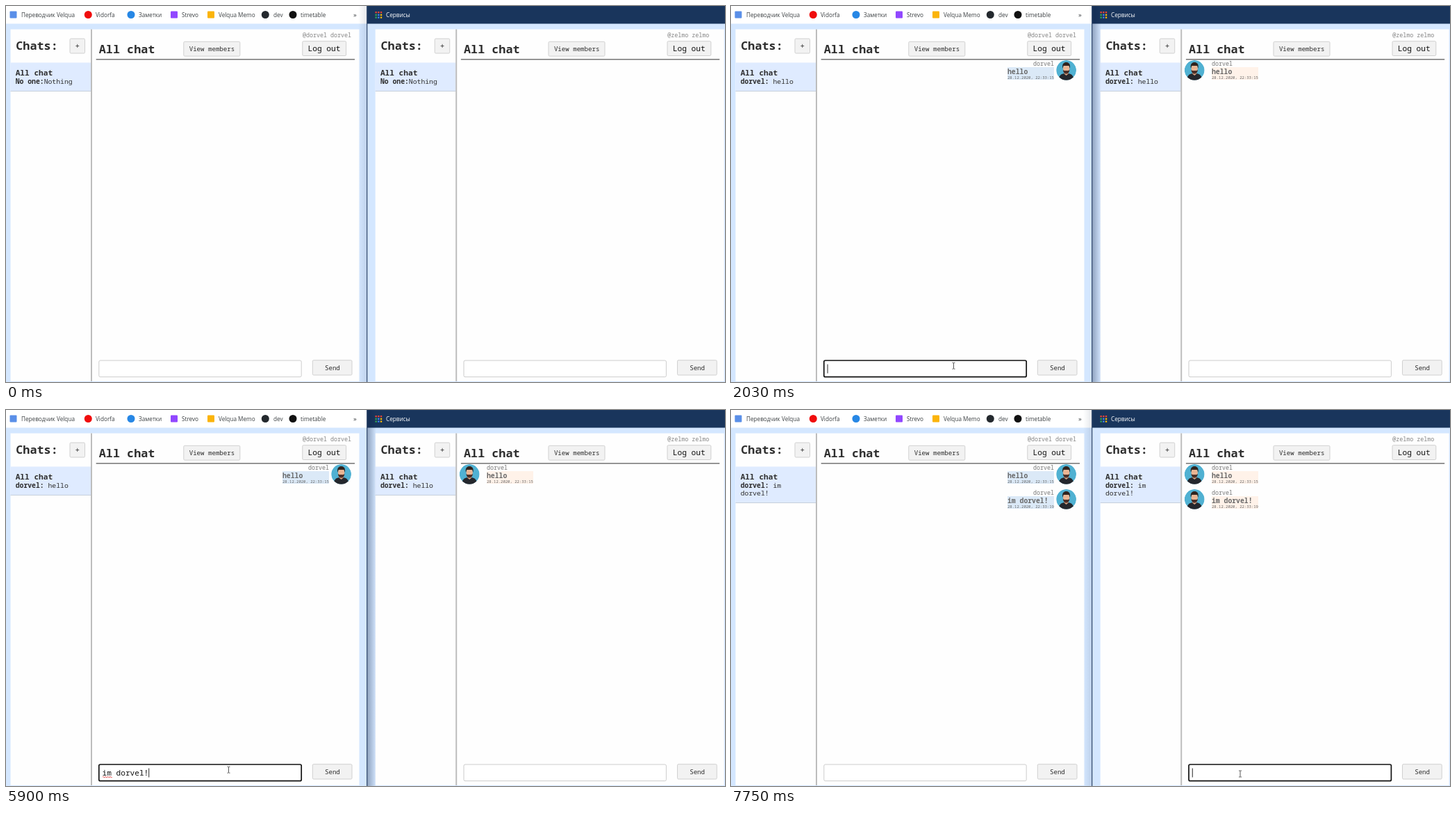
Write an HTML page that moves like this. It is 1035 by 541 pixels and loops after 8000 ms.

```html
<!DOCTYPE html>
<html lang="en">
<head>
<meta charset="utf-8">
<title>Two chat windows</title>
<style>
  html, body { margin: 0; width: 100%; height: 100%; overflow: hidden; background: #d4e7ff; }
  svg { display: block; }
  text { font-family: "Noto Sans Mono", "DejaVu Sans Mono", monospace; white-space: pre; fill: #2d2d2d; }
  .ui { font-family: "Open Sans", "Noto Sans", sans-serif; font-size: 8.2px; fill: #3c4043; }
  .b { font-weight: 700; }
  .m { font-weight: 500; }
</style>
</head>
<body>
<svg id="stage" width="1035" height="541" viewBox="0 0 1035 541"></svg>
<script>
const LOOP = 8000;
const SHIFT = 525.2;
const CHAR = 6.67;
const INPUT_X = 138.6;
const ME = 'dorvel', OTHER = 'zelmo';

const rect = (x, y, w, h, fill, extra = '') =>
  `<rect x="${x}" y="${y}" width="${w}" height="${h}" fill="${fill}" ${extra}/>`;
const text = (x, y, size, str, cls = '', extra = '') =>
  `<text x="${x}" y="${y}" font-size="${size}" class="${cls}" ${extra}>${str}</text>`;
const button = (x, y, w, h, id = '') =>
  rect(x, y, w, h, '#f2f2f2', `rx="1.5" stroke="#d0d0d0" id="${id}"`);

const avatar = (x, y) => `<g transform="translate(${x} ${y})" clip-path="url(#round)">
  <circle r="14.4" fill="#50b1d2"/>
  <path d="M-11 15C-11 8-8 5.5-3 4.5L0 7 3 4.5C8 5.5 11 8 11 15Z" fill="#24272d"/>
  <path d="M-3 1H3V5L0 7.500-3 5Z" fill="#dba07e"/>
  <ellipse cy="-2.500" rx="4.700" ry="6" fill="#eab593"/>
  <path d="M-4.700-1C-4 1-2 .6 0 .6S4 1 4.700-1C4.600 3 2.500 5 0 5S-4.600 3-4.700-1Z" fill="#4b3029"/>
  <path d="M-5.200-2.500C-6.500-9-3.500-11.500 0-11.500S6.500-9 5.200-2.500L4-6.500H-4Z" fill="#30241f"/>
</g>`;

function message(own, y, body, time) {
  const x = own ? 398 : 692 - SHIFT;
  const name = own ? text(465, y + 8, 8.35, ME, 'm', 'text-anchor="end" style="fill:#777"')
                   : text(x, y + 8, 8.35, ME, 'm', 'style="fill:#777"');
  return name
    + rect(x, y + 10, 67, 18, own ? '#dbe9f7' : '#fff2e9')
    + text(x, y + 19.5, 9.75, body, 'b', 'style="fill:#6a6a6a"')
    + text(x, y + 26.5, 5.58, `28.12.2020, ${time}`, '', 'style="fill:#666"')
    + avatar(own ? 482.6 : 142, y + 14.4);
}

function panel(id, dx, user, own) {
  return `<g transform="translate(${dx} 0)">
    ${rect(6.5, 33.5, 502, 506.5, '#fefefe')}
    <g id="${id}-item"></g>
    ${rect(122, 33.5, 2, 506.500, '#bdbdbd')}
    ${text(14.3, 63, 16.8, 'Chats:', 'b')}
    ${button(92, 47, 21.5, 21, id + '-add')}
    ${text(102.8, 61, 11, '+', 'm', 'text-anchor="middle"')}
    ${text(133.800, 68, 16.8, 'All chat', 'b')}
    ${button(255.8, 51.3, 81, 20.8)}
    ${text(263.7, 64.8, 9.1, 'View members', 'm')}
    ${text(427, 45, 8.35, `@${user} ${user}`, 'm', 'style="fill:#858585"')}
    ${button(426.800, 50.7, 62.8, 20.800)}
    ${text(434.5, 65, 11.2, 'Log out', 'm', 'style="fill:#111"')}
    ${rect(129.7, 76, 372.3, 1.6, '#7c7c7c')}
    <g id="${id}-m1">${message(own, 78, 'hello', '22:33:15')}</g>
    <g id="${id}-m2">${message(own, 114, `im ${ME}!`, '22:33:19')}</g>
    ${rect(133.8, 510, 291.4, 23.700, '#fff', `rx="2" id="${id}-box"`)}
    <text id="${id}-val" x="${INPUT_X}" y="526" font-size="11.12" style="fill:#111"></text>
    <path id="${id}-wave" d="M139 528.200q.85-1.700 1.700 0t1.700 0 1.700 0 1.700 0 1.700 0 1.700 0 1.700 0 1.700 0" fill="none" stroke="#e02020" stroke-width=".9"/>
    ${rect(0, 515.5, 0.9, 13, '#111', `id="${id}-caret"`)}
    ${button(441.3, 509.700, 56.700, 21.300)}
    ${text(459, 524, 9.1, 'Send', 'm')}
  </g>`;
}

// [icon shape, icon centre, colour, label x, label]
const bookmarks = [
  ['s', 10.5, '#5a8fe8', 22, 'Переводчик Velqua'],
  ['c', 118.3, '#f00d0d', 129, 'Vidorfa'],
  ['c', 180, '#2787e5', 191, 'Заметки'],
  ['s', 242, '#9147ff', 253, 'Strevo'],
  ['s', 295, '#fbb40a', 306, 'Velqua Memo'],
  ['c', 373.3, '#24292e', 385, 'dev'],
  ['c', 413, '#111', 424, 'timetable']
];
const marks = bookmarks.map(([shape, x, color, tx, label]) =>
  (shape === 's' ? rect(x - 5, 7.5, 10, 10, color, 'rx="1"')
                 : `<circle cx="${x}" cy="12.5" r="5.500" fill="${color}"/>`)
  + `<text class="ui" x="${tx}" y="15.7">${label}</text>`).join('');

const dotColors = ['#ea4335', '#ea4335', '#ea4335', '#34a853', '#4285f4', '#fbbc05', '#34a853', '#4285f4', '#fbbc05'];
const dots = dotColors.map((c, i) => rect(531.5 + i % 3 * 3.7, 8 + Math.floor(i / 3) * 3.7, 2.3, 2.3, c)).join('');

document.getElementById('stage').innerHTML = `
  <defs>
    <clipPath id="round"><circle r="14.4"/></clipPath>
    <linearGradient id="fade"><stop stop-color="#0a1f44" stop-opacity=".34"/><stop offset="1" stop-color="#0a1f44" stop-opacity="0"/></linearGradient>
    <linearGradient id="fadeLeft"><stop stop-color="#0a1f44" stop-opacity="0"/><stop offset="1" stop-color="#0a1f44" stop-opacity=".1"/></linearGradient>
  </defs>
  ${rect(0, 0, 1035, 541, '#d4e7ff')}
  ${rect(0, 0, 519, 25.5, '#fff')}
  ${rect(520, 0, 515, 25.5, '#19355c')}
  ${marks}
  <text class="ui" x="500" y="15.5" style="font-size:9.5px">»</text>
  ${dots}
  <text class="ui" x="547" y="15.7" style="fill:#fff">Сервисы</text>
  ${panel('l', 0, ME, true)}
  ${panel('r', SHIFT, OTHER, false)}
  ${rect(520, 0, 13, 541, 'url(#fade)', 'id="shadeR"')}
  ${rect(507, 0, 12, 541, 'url(#fadeLeft)', 'id="shadeL"')}
  ${rect(519, 0, 1.3, 541, '#3b5273')}
  <g id="pointer">
    <ellipse id="disc" cx="-1" rx="9" ry="8.500" fill="#ffff55" opacity=".9"/>
    <path id="beam" d="M-2-4.500H-.6L0-4 .6-4.500H2M0-4V4M-2 4.500H-.6L0 4 .6 4.500H2" fill="none" stroke="#444" stroke-width=".9"/>
    <path id="arrow" d="M0 0V9.200L2.100 7.300 3.500 10.500 5 9.800 3.600 6.700H6.400Z" fill="#fff" stroke="#333" stroke-width=".9"/>
  </g>`;

const $ = id => document.getElementById(id);
const show = (id, on) => $(id).setAttribute('visibility', on ? 'visible' : 'hidden');
const at = (steps, t) => steps.filter(s => s[0] <= t).pop();

// [time, value, caret shown]
const typing = [
  [0, '', 0], [680, '', 1], [1170, '', 0],
  [1260, 'h', 1], [1340, 'he', 1], [1430, 'hel', 1], [1630, 'hell', 1], [1760, 'hello', 1],
  [1960, '', 1], [2520, '', 0], [3020, '', 1],
  [3180, 'i', 1], [3450, 'im', 1], [4010, 'im ', 1], [4270, 'im f', 1], [4570, 'im ', 1],
  ...[4800, 4900, 5040, 5200, 5370, 5500].map((t, i) => [t, 'im ' + ME.slice(0, i + 1), 1]),
  [5900, `im ${ME}!`, 1], [6130, '', 1], [6580, '', 0]
];
const answer = [[0, '', 0], [7750, '', 1]];

// [time, x, y]
const path = [
  [110, 720, 522], [570, 320.5, 517.7], [6250, 320.5, 517.7], [6580, 430, 470],
  [6940, 430, 470], [7290, 752.5, 402.5], [7340, 752.5, 402.5], [7630, 733, 523.5]
];

function place(t) {
  const i = path.findIndex(p => p[0] > t);
  if (i === 0) return path[0].slice(1);
  if (i < 0) return path[path.length - 1].slice(1);
  const [t0, x0, y0] = path[i - 1], [t1, x1, y1] = path[i];
  const u = (t - t0) / (t1 - t0), e = u * u * (3 - 2 * u);
  return [x0 + (x1 - x0) * e, y0 + (y1 - y0) * e];
}

function drawItem(id, stage) {
  if ($(id).dataset.stage === String(stage)) return;
  $(id).dataset.stage = stage;
  const h = stage === 2 ? 51.5 : 40.5;
  const [who, said] = [['No one:', 'Nothing'], [ME + ': ', 'hello'], [ME + ': ', 'im']][stage];
  $(id).innerHTML = rect(6.5, 81.5, 115.5, h, '#dfebff')
    + rect(6.5, 81.5 + h, 115.5, 1, '#c6cfdb')
    + text(13.7, 100, 11.15, 'All chat', 'b')
    + text(13.7, 112, 9.75, `<tspan class="b">${who}</tspan>${said}`)
    + (stage === 2 ? text(13.7, 123.3, 9.75, ME + '!') : '');
}

function drawInput(id, [, value, caret], focused) {
  $(id + '-val').textContent = value;
  $(id + '-caret').setAttribute('x', INPUT_X + CHAR * value.length);
  show(id + '-caret', caret);
  $(id + '-box').setAttribute('stroke', focused ? '#111' : '#ccc');
  $(id + '-box').setAttribute('stroke-width', focused ? 1.7 : 1);
}

function draw(t) {
  const leftActive = t >= 600 && t < 7710;
  show('shadeR', leftActive);
  show('shadeL', !leftActive);

  for (const [id, lag] of [['l', 0], ['r', 70]]) {
    const stage = t >= 6130 + lag ? 2 : t >= 1960 + lag ? 1 : 0;
    drawItem(id + '-item', stage);
    show(id + '-m1', stage > 0);
    show(id + '-m2', stage > 1);
  }
  drawInput('l', at(typing, t), t >= 680 && t < 7710);
  drawInput('r', at(answer, t), t >= 7750);
  show('l-wave', t >= 4100 && t < 6130);
  show('r-wave', false);
  $('r-add').setAttribute('stroke', t >= 7710 && t < 7750 ? '#111' : '#d0d0d0');

  const [x, y] = place(t);
  const overInput = y > 510 && y < 534 && (x > 133 && x < 426 || x > 658 && x < 951);
  const visible = t >= 110;
  $('pointer').setAttribute('transform', `translate(${x} ${y})`);
  show('beam', visible && overInput);
  show('arrow', visible && !overInput);
  show('disc', t >= 600 && t < 720 || t >= 7650 && t < 7750);
}

function tick() {
  draw(performance.now() % LOOP);
  requestAnimationFrame(tick);
}
tick();
</script>
</body>
</html>
```
